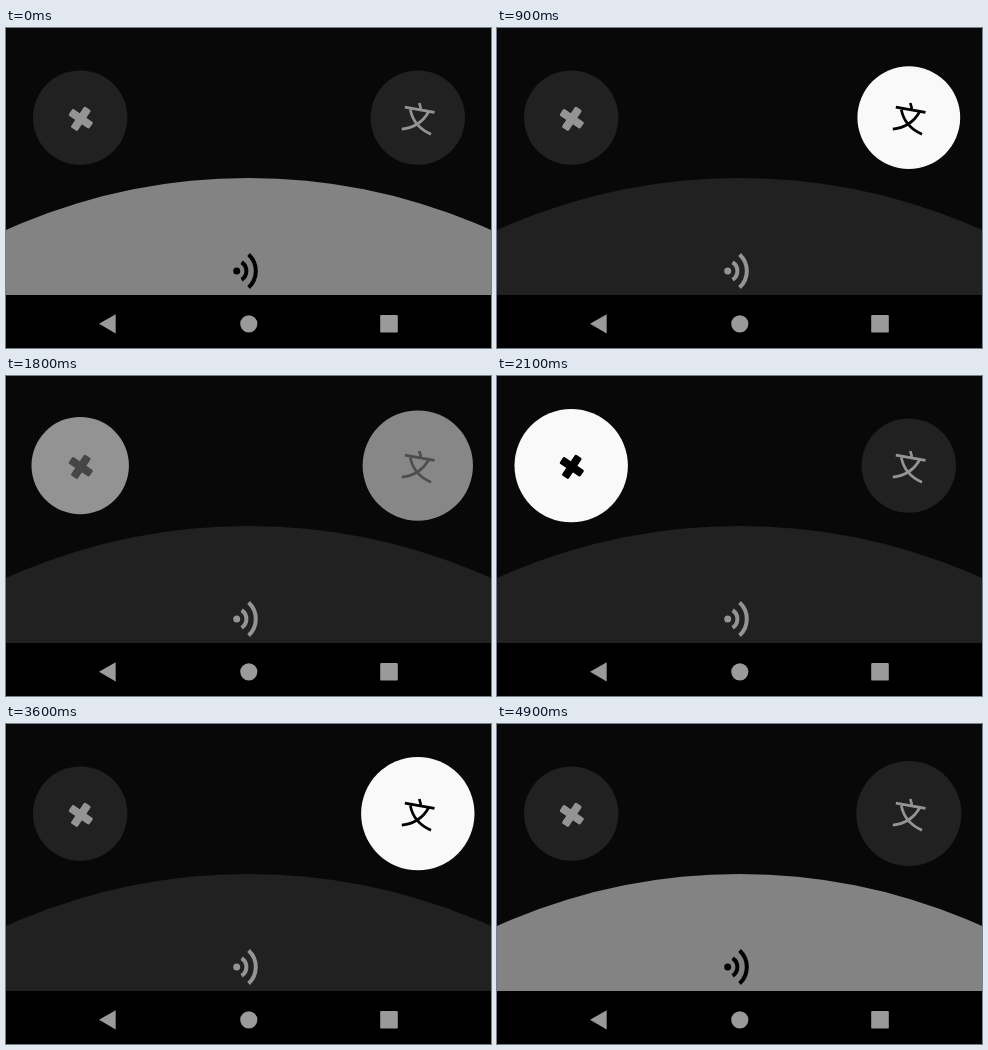
These frames come from a looping animation (485x320 px, 5000 ms). An HTML page:

```html
<!DOCTYPE html>
<html lang="en">
<head>
<meta charset="utf-8">
<style>
  html, body { margin: 0; width: 100%; height: 100%; overflow: hidden; background: #080808; }
  svg { display: block; width: 485px; height: 320px; }
  .line { fill: none; stroke: currentColor; }
</style>
</head>
<body>
<svg viewBox="0 0 485 320">
  <g id="cross">
    <circle class="disc" cx="74.2" cy="89.6"/>
    <g fill="currentColor" transform="translate(74.8 90.8) rotate(34)">
      <rect x="-12.5" y="-4" width="25" height="8" rx="1.5"/>
      <rect x="-4" y="-12.5" width="8" height="25" rx="1.5"/>
    </g>
  </g>
  <g id="translate">
    <circle class="disc" cx="411.8" cy="89.6"/>
    <path class="line" stroke-width="2.7" d="M413.3 75L415 81M398.8 79.2L428.5 84.4M422.5 84Q414 99 395.8 101.2M404.3 81.5Q407.5 98.5 425 106.2"/>
  </g>
  <g id="dome">
    <circle class="disc" cx="242.5" cy="741.5" r="591.5"/>
    <circle cx="230.7" cy="243" r="3.5" fill="currentColor"/>
    <path class="line" stroke-width="4" d="M235.6 234.2A10.5 10.5 0 0 1 235.6 251.8M242.6 226.5A22.5 22.5 0 0 1 242.6 259.5"/>
  </g>
  <rect y="267" width="485" height="53"/>
  <g fill="#9a9a9a">
    <path d="M93 295.8L109.7 286.2V305.4Z"/>
    <circle cx="242.8" cy="295.8" r="8.6"/>
    <rect x="374.2" y="287" width="17.6" height="17.6" rx="1.2"/>
  </g>
</svg>
<script>
const LOOP = 5000, STEP = 100;
// The selection hops between the three controls.
const moves = [
  { at: 800, steps: 4, from: "dome", to: "translate" },
  { at: 1800, steps: 4, from: "translate", to: "cross" },
  { at: 3400, steps: 3, from: "cross", to: "translate" },
  { at: 4800, steps: 3, from: "translate", to: "dome" }
];
const growth = [0.16, 0.44, 0.85, 1];
const fade = [0.53, 1, 1, 1];
const mix = (a, b, k) => a + (b - a) * k;
const grey = v => `rgb(${Array(3).fill(Math.round(v))})`;

function paint(id, size, tone) {
  const group = document.getElementById(id);
  const disc = group.querySelector(".disc");
  const isDome = id === "dome";
  disc.setAttribute("fill", grey(mix(33, isDome ? 131 : 249, tone)));
  if (!isDome) disc.setAttribute("r", mix(47.2, 56.7, size));
  group.style.color = grey(mix(148, 0, tone));
}

function draw(now) {
  const t = now % LOOP;
  const move = moves.findLast(m => t >= m.at) || moves[3];
  const i = t < move.at ? move.steps : Math.floor((t - move.at) / STEP);
  const done = i >= move.steps - 1;
  const size = done ? 1 : growth[i], tone = done ? 1 : fade[i];
  for (const id of ["cross", "translate", "dome"]) {
    if (id === move.to) paint(id, size, tone);
    else if (id === move.from) paint(id, 1 - size, 1 - tone);
    else paint(id, 0, 0);
  }
}

const start = performance.now();
function tick() {
  draw(performance.now() - start);
  requestAnimationFrame(tick);
}
tick();
</script>
</body>
</html>
```
